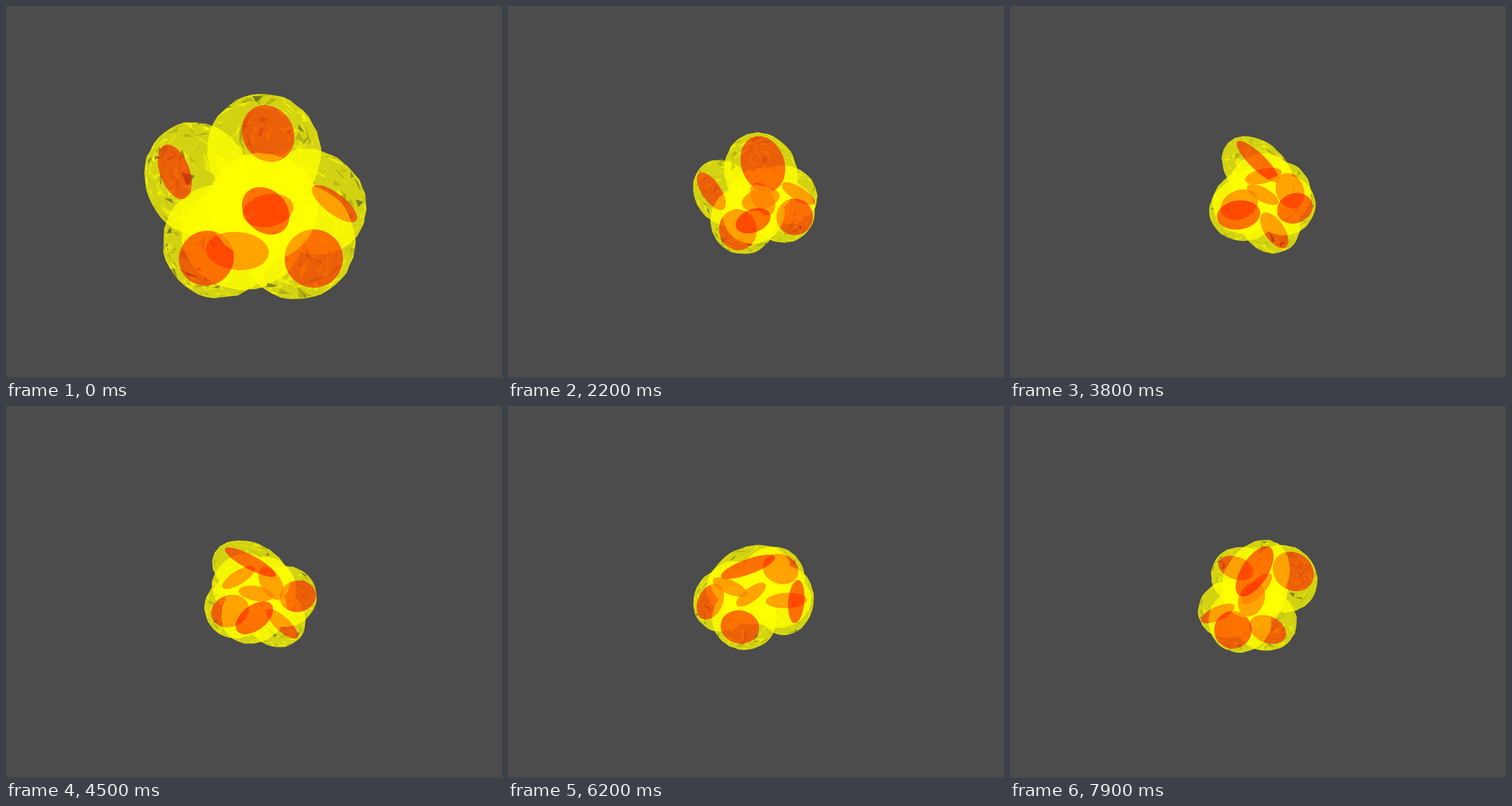
Write an HTML page with a canvas that moves like this. It is 864 px wide and 648 px high and loops after 8000 ms.

```html
<!DOCTYPE html>
<html lang="en">
<head>
<meta charset="utf-8">
<title>Rotating cell cluster</title>
<style>
  html, body { margin: 0; width: 100%; height: 100%; overflow: hidden; background: #4c4c4c; }
  canvas { display: block; width: 864px; height: 648px; }
</style>
</head>
<body>
<canvas id="stage" width="864" height="648"></canvas>
<script>
const ctx = document.getElementById('stage').getContext('2d');
const LOOP = 8000, STEP = 100, CUT = 600;
const TURN = 3.75;                  // degrees per step
const CX = 432, CY = 333;
const SIN = 0.64, COS = 0.77;       // camera elevation
const SPREAD = 0.72;                // cell centre relative to its nucleus
const RAD = Math.PI / 180;

let seed = 7;
function rnd() {
  seed = (seed * 16807) % 2147483647;
  return seed / 2147483647;
}
const jitter = size => (rnd() - 0.5) * 2 * size;

// Each row: orbit radius, orbit angle, height on screen, nucleus radius, normal angle, normal rise
const bigCluster = makeCluster({ start: 0, pad: 50, cellDepth: 88, depth: 18, flecks: 190 }, [
  [26, 110, 228, 51, 43, 0.74],
  [138, -92, 292, 50, 83, 0.5],
  [142, 81, 330, 48, 127, 0.64],
  [129, -40, 376, 49, 13, 0.45],
  [29, -94, 428, 55, 150, 0.99],
  [138, 49, 382, 51, 0, 0.64],
  [117, 10, 283, 46, 59, 0.84],
  [89, 164, 411, 45, -126, 0.98]
]);
const smallCluster = makeCluster({ start: 1100, pad: 22, cellDepth: 49, depth: 12, flecks: 150 }, [
  [14, 80, 280, 50, 15, 0.64],
  [72, 28, 351, 32, -42, 0.64],
  [80, 72, 347, 33, 96, 0.64],
  [78, -127, 319, 38, -95, -0.2],
  [77, -45, 325, 32, -145, 0.95],
  [60, -73, 357, 36, -8, 0.64],
  [43, 128, 364, 34, -170, 0.95],
  [12, 35, 334, 31, 40, 0.64]
]);

function makeFlecks(count) {
  return Array.from({ length: count }, () => {
    const angle = rnd() * 360, rise = rnd() * 2 - 1, tone = rnd();
    const corners = [0.03, 0.22, 0.16].map(size => {
      const k = Math.max(-1, Math.min(1, rise + jitter(size)));
      return [angle + jitter(size) * 60 / Math.sqrt(1.05 - k * k), k];
    });
    return { corners, tone };
  });
}

function makeCluster(opts, rows) {
  const parts = rows.map(row => ({
    row,
    cellFlecks: makeFlecks(opts.flecks),
    coreFlecks: makeFlecks(60),
    rough: Array.from({ length: 44 }, () => 1 + jitter(0.013))
  }));
  return { ...opts, parts };
}

// Unit direction on screen, z towards the viewer
function direction(angle, rise) {
  const flat = Math.sqrt(Math.max(0, 1 - rise * rise));
  const side = flat * Math.sin(angle * RAD), front = flat * Math.cos(angle * RAD);
  return [side, front * SIN - rise * COS, front * COS + rise * SIN];
}

function disc(x, y, a, b, n) {
  return {
    x, y, a, b, n,
    minor: Math.sqrt(b * b + (a * a - b * b) * n[2] * n[2]),
    tilt: Math.atan2(n[1], n[0])
  };
}

function pose(part, cluster, turn) {
  const [r, angle, height, size, normal, rise] = part.row;
  const phi = (angle + turn) * RAD;
  const front = r * Math.cos(phi);
  const dx = r * Math.sin(phi), dy = height - CY + front * SIN;
  const n = direction(normal + turn, rise);
  return {
    part,
    z: (CY - height) / COS * SIN + front * COS,
    core: disc(CX + dx, CY + dy, size, cluster.depth, n),
    cell: disc(CX + dx * SPREAD, CY + dy * SPREAD, size + cluster.pad, cluster.cellDepth, n)
  };
}

function surfacePoint(d, corner, turn) {
  const v = direction(corner[0] + turn, corner[1]);
  const dot = v[0] * d.n[0] + v[1] * d.n[1] + v[2] * d.n[2];
  const [x, y, z] = v.map((c, i) => d.a * c + (d.b - d.a) * dot * d.n[i]);
  return [d.x + x, d.y + y, z];
}

function inside(d, x, y) {
  const c = Math.cos(d.tilt), s = Math.sin(d.tilt);
  const u = (x - d.x) * c + (y - d.y) * s, v = (y - d.y) * c - (x - d.x) * s;
  return (u / d.minor) ** 2 + (v / d.a) ** 2 < 1;
}

function addOutline(path, d, rough) {
  const c = Math.cos(d.tilt), s = Math.sin(d.tilt);
  rough.forEach((k, i) => {
    const t = i / rough.length * 2 * Math.PI;
    const u = d.minor * k * Math.cos(t), v = d.a * k * Math.sin(t);
    const x = d.x + u * c - v * s, y = d.y + u * s + v * c;
    i ? path.lineTo(x, y) : path.moveTo(x, y);
  });
  path.closePath();
}

function corePath(d) {
  const path = new Path2D();
  path.ellipse(d.x, d.y, d.minor, d.a, d.tilt, 0, 2 * Math.PI);
  return path;
}

function fillPolygon(points, style) {
  ctx.fillStyle = style;
  ctx.beginPath();
  points.forEach(p => ctx.lineTo(p[0], p[1]));
  ctx.fill();
}

function drawCell(body, all, turn) {
  const path = new Path2D();
  addOutline(path, body.cell, body.part.rough);
  ctx.fillStyle = 'rgba(255,255,0,0.75)';
  ctx.fill(path);
  ctx.strokeStyle = 'rgba(255,255,0,0.6)';
  ctx.stroke(path);
  for (const { corners, tone } of body.part.cellFlecks) {
    const points = corners.map(c => surfacePoint(body.cell, c, turn));
    const [x, y] = points[0];
    const dark = tone < 0.42;
    if (dark && all.some(o => o !== body && inside(o.cell, x, y))) continue;
    if (dark) {
      fillPolygon(points, tone < 0.1 ? 'rgba(70,70,40,0.55)' : 'rgba(120,120,20,0.3)');
    } else {
      fillPolygon(points, 'rgba(255,255,0,0.5)');
    }
  }
}

function drawCore(body, all, turn) {
  const path = corePath(body.core);
  ctx.save();
  ctx.clip(path);
  ctx.fillStyle = 'rgba(255,0,0,0.54)';
  ctx.fill(path);
  for (const { corners, tone } of body.part.coreFlecks) {
    const points = corners.map(c => surfacePoint(body.core, c, turn));
    if (points[0][2] < 0) continue;
    fillPolygon(points, tone < 0.45 ? 'rgba(240,40,0,0.32)' : 'rgba(255,140,0,0.3)');
  }
  // Nearer cells veil the nucleus
  const veil = new Path2D();
  all.filter(o => o.z > body.z).forEach(o => addOutline(veil, o.cell, o.part.rough));
  ctx.fillStyle = 'rgba(255,255,0,0.34)';
  ctx.fill(veil);
  ctx.restore();
}

function draw(time) {
  const cluster = time < CUT ? bigCluster : smallCluster;
  const turn = (time - cluster.start) / STEP * TURN;
  const all = cluster.parts.map(p => pose(p, cluster, turn)).sort((a, b) => a.z - b.z);
  ctx.fillStyle = '#4c4c4c';
  ctx.fillRect(0, 0, 864, 648);
  ctx.fillStyle = '#4b4548';
  ctx.fillRect(0, 646, 864, 2);
  ctx.lineWidth = 1;
  all.forEach(body => drawCell(body, all, turn));
  all.forEach(body => drawCore(body, all, turn));
}

const origin = performance.now();
let shown = -1;
function tick() {
  const time = Math.floor((performance.now() - origin) % LOOP / STEP) * STEP;
  if (time !== shown) draw(shown = time);
  requestAnimationFrame(tick);
}
tick();
</script>
</body>
</html>
```
